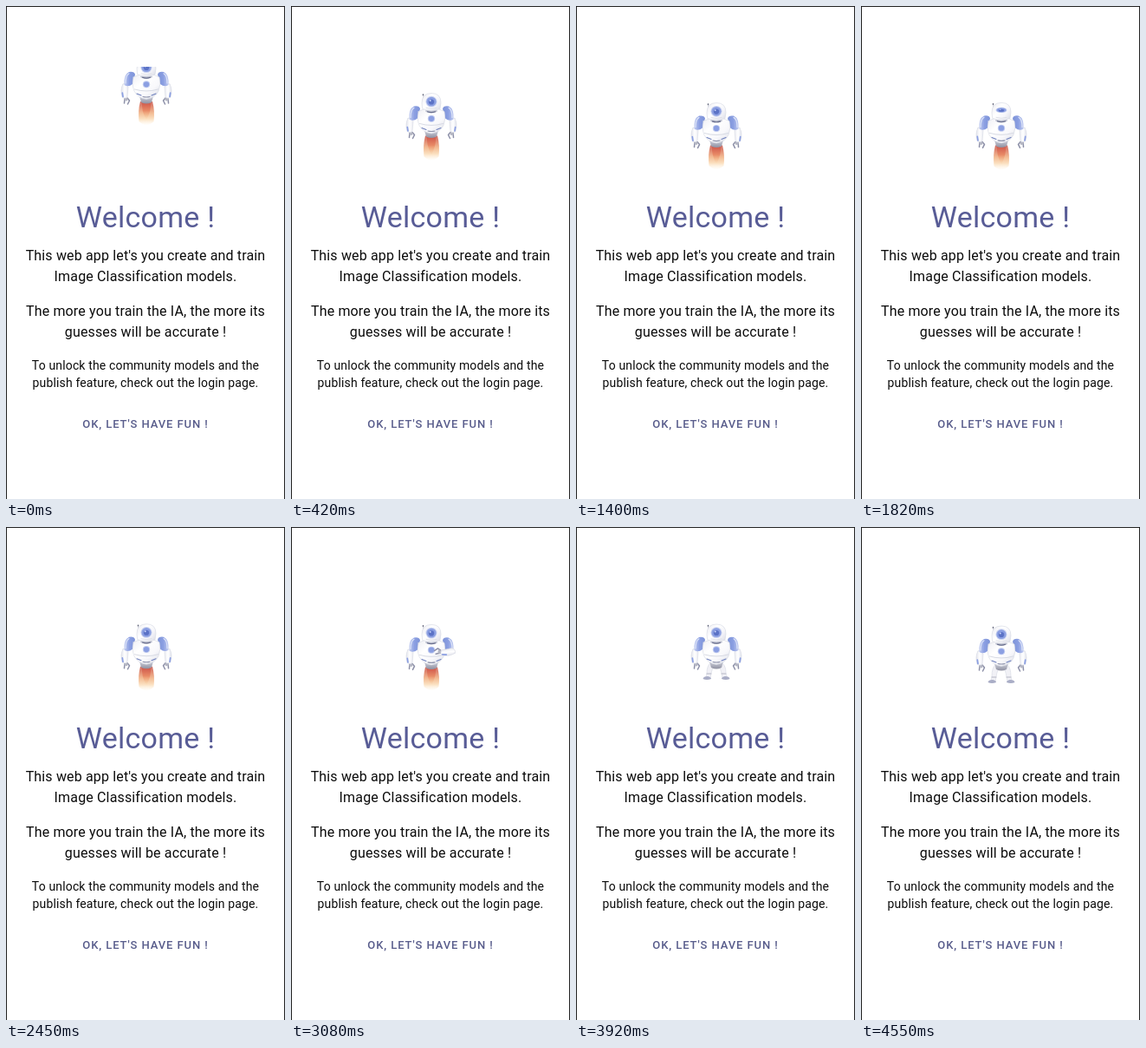
An HTML page with a canvas for the animation above (4.83 s loop, 322 by 568 pixels).

```html
<!DOCTYPE html>
<html lang="en">
<head>
<meta charset="utf-8">
<title>Welcome</title>
<style>
  html, body { margin: 0; width: 100%; height: 100%; overflow: hidden; background: #fff; }
  #stage { position: absolute; left: 0; top: 0; width: 322px; height: 568px; box-sizing: border-box;
    border: solid #222; border-width: 1px 1px 0; font-family: Roboto, sans-serif; color: #0c0c0c; }
  canvas { position: absolute; left: -1px; top: -1px; width: 322px; height: 568px; }
  p { position: absolute; left: -1px; width: 322px; margin: -1px 0 0; text-align: center; white-space: pre; }
  .title { top: 222px; font-size: 34px; line-height: 42px; letter-spacing: .00735em; color: #585c96; }
  .body { font-size: 16px; line-height: 24px; letter-spacing: .00938em; }
  .small { top: 404px; font-size: 14px; line-height: 20px; letter-spacing: .01071em; }
  .button { top: 472px; font-size: 13px; line-height: 20px; font-weight: 500; letter-spacing: .07em; color: #595d8c; }
</style>
</head>
<body>
<div id="stage">
  <canvas></canvas>
  <p class="title">Welcome !</p>
  <p class="body" style="top:276px">This web app let's you create and train
Image Classification models.</p>
  <p class="body" style="top:340px">The more you train the IA, the more its
guesses will be accurate !</p>
  <p class="small">To unlock the community models and the
publish feature, check out the login page.</p>
  <p class="button">OK, LET'S HAVE FUN !</p>
</div>
<script>
const LOOP = 4830, STEP = 70, LAST = 4550;
const CX = 162, CLIP_TOP = 70;
const BLUE = '#8b9fe2', NAVY = '#5b72c6', PALE = '#c3cdf1', GREY = '#b5b7c4', EDGE = '#d6d8e2';

const canvas = document.querySelector('canvas');
const ctx = canvas.getContext('2d');
const dpr = window.devicePixelRatio || 1;
canvas.width = 322 * dpr;
canvas.height = 568 * dpr;

const clamp = v => Math.min(1, Math.max(0, v));
const ease = (t, a, b) => { const k = clamp((t - a) / (b - a)); return k * k * (3 - 2 * k); };
const pulse = (t, a, b, c, d) => ease(t, a, b) - ease(t, c, d);

function fill(d, color, edge) {
  const path = new Path2D(d);
  ctx.fillStyle = color;
  ctx.fill(path);
  if (edge) {
    ctx.strokeStyle = edge;
    ctx.lineWidth = .6;
    ctx.stroke(path);
  }
}

function oval(x, y, rx, ry, color) {
  ctx.fillStyle = color;
  ctx.beginPath();
  ctx.ellipse(x, y, rx, ry, 0, 0, Math.PI * 2);
  ctx.fill();
}

function line(d, color, width) {
  ctx.strokeStyle = color;
  ctx.lineWidth = width;
  ctx.stroke(new Path2D(d));
}

function shade(x0, y0, x1, y1, ...colors) {
  const g = ctx.createLinearGradient(x0, y0, x1, y1);
  colors.forEach((c, i) => g.addColorStop(i / (colors.length - 1), c));
  return g;
}

function group(draw) {
  ctx.save();
  draw();
  ctx.restore();
}

// Draws a left-hand part, then its reflection.
function bothSides(draw) {
  for (const side of [1, -1]) group(() => {
    ctx.translate(CX, 0);
    ctx.scale(side, 1);
    ctx.translate(-CX, 0);
    draw(side);
  });
}

function flame(t, power) {
  if (power <= 0) return;
  const end = 188 + Math.sin(t / 55);
  group(() => {
    ctx.globalAlpha = power;
    ctx.filter = `blur(${.6 * dpr}px)`;
    fill(`M155 161 H169 Q172 172 170.5 ${end - 4} Q162 ${end + 4} 153.5 ${end - 4} Q152 172 155 161Z`,
      shade(0, 161, 0, end, '#cf6a62', '#e39076', '#f3bd95', '#fbe0c0', 'rgba(255,246,230,.2)'));
    fill(`M157 161 H167 Q168 172 162 ${end - 6} Q156 172 157 161Z`,
      shade(0, 161, 0, end - 6, '#cc5148', '#e88a66', 'rgba(252,214,160,0)'));
  });
}

function legs(grow, drop) {
  if (grow <= 0) return;
  const foot = 161 + (14 + drop) * grow;
  bothSides(() => {
    fill(`M155 157 L161 160 Q157 162 156 ${foot - 6} L155 ${foot - 1} H150 L151 ${foot - 7} Q151 160 155 157Z`, '#f1f1f6', EDGE);
    line(`M151 ${foot - 6} H156`, GREY, 1);
    fill(`M146.5 ${foot} Q147 ${foot - 3} 152 ${foot - 3} Q156 ${foot - 2} 156 ${foot} Q151 ${foot + 2} 146.5 ${foot}Z`, '#a9adc6');
  });
}

function forearm(turn) {
  group(() => {
    ctx.translate(137, 143);
    ctx.rotate(turn);
    ctx.translate(-137, -143);
    line('M137 157 L136.5 163 M140 157 L142.5 160 L140.5 164', '#8d90a8', 1.5);
    oval(138.5, 158.5, 2.2, 2, GREY);
    fill('M135 141 Q139 139 141 144 L140 156 Q137 158.5 134 156 Q131.5 147 135 141Z',
      shade(132, 0, 142, 0, '#dcdee8', '#fff', '#e6e7ef'), EDGE);
    line('M134.3 151 L135 155.5', BLUE, 1.7);
  });
}

function shoulder() {
  fill('M136.5 142 Q135.5 130 142 127 Q148 126 149 130 L146 141 Q141 145 136.5 142Z',
    shade(136, 0, 149, 0, PALE, BLUE, '#7d93d8'));
  line('M138 140 Q138 131 142 128.8', '#dde4f8', 1.2);
}

function torso() {
  fill('M154 155 H170 L168 162 Q162 165 156 162Z', shade(0, 155, 0, 164, '#d0d2dd', '#8b8d9e'));
  fill('M147 133 Q154 129 162 129 Q170 129 177 133 Q179 142 176 149 Q172 157 162 158.5 Q152 157 148 149 Q145 142 147 133Z',
    shade(148, 130, 174, 160, '#f0f0f5', '#fff', '#f8f8fb', '#dadce6'), EDGE);
  line('M148.5 147 Q162 151 175.5 147', '#cfd2de', .8);
  oval(162, 141.3, 4.2, 4, PALE);
  oval(162, 141.3, 3.2, 3.1, BLUE);
  line('M151 152 L156 154 M168 154 L173 152', '#6f80bd', 1.1);
  line('M158 155.5 Q162 156.5 166 155.5', '#8f94ac', 1.1);
}

function head(look) {
  oval(162, 132.5, 7, 2.2, '#c2c5d3');
  line('M157.5 133.3 Q162 135 166.5 133.3', '#666c8c', 1.2);
  line('M152.5 119 V114', '#c4c6d1', .8);
  oval(152.5, 113.7, .8, 1, '#62657a');
  fill('M151 123 Q151 112 162 112 Q173 112 173 123 L172 130 Q162 134 152 130Z',
    shade(151, 115, 174, 131, '#ededf3', '#fff', '#f6f6fa', '#d8dae4'), EDGE);
  const y = 121.7 - look * 1.2;
  const squash = 1 - look * .5;
  oval(162, y, 6.6, 6.4 * squash, '#cdd5f1');
  oval(162, y, 5.6, 5.4 * squash, BLUE);
  oval(162, y + .3, 3.2, 3.1 * squash, NAVY);
  oval(160.7, y - 1.2 * squash, 1, .9 * squash, '#cbd7fb');
  line('M156 129 Q162 131 168 129', '#d5d7e0', .7);
}

function draw(t) {
  const arrive = -51 * (1 - clamp(t / 800)) ** 2;
  const hover = -.6 * Math.sin((t - 980) / 540) * ease(t, 800, 1100) * (1 - ease(t, 3200, 3500));
  const settle = 2 * ease(t, 3920, 4480);
  const look = pulse(t, 1450, 1750, 2050, 2350);
  const wave = pulse(t, 2520, 2900, 3250, 3650);
  const landing = ease(t, 3140, 3360);

  ctx.setTransform(dpr, 0, 0, dpr, 0, 0);
  ctx.clearRect(0, 0, 322, 568);
  group(() => {
    ctx.beginPath();
    ctx.rect(86, CLIP_TOP, 150, 130);
    ctx.clip();
    ctx.lineCap = ctx.lineJoin = 'round';
    ctx.translate(0, arrive + hover + settle);
    flame(t, 1 - landing);
    legs(landing, settle);
    bothSides(side => {
      if (side > 0 || wave < .05) forearm(0);
      shoulder();
    });
    torso();
    head(look);
    if (wave >= .05) bothSides(side => { if (side < 0) forearm(-1.45 * wave); });
  });
}

const start = performance.now();

function tick() {
  const t = (performance.now() - start) % LOOP;
  draw(Math.min(LAST, Math.floor(t / STEP) * STEP));
  requestAnimationFrame(tick);
}

tick();
</script>
</body>
</html>
```
